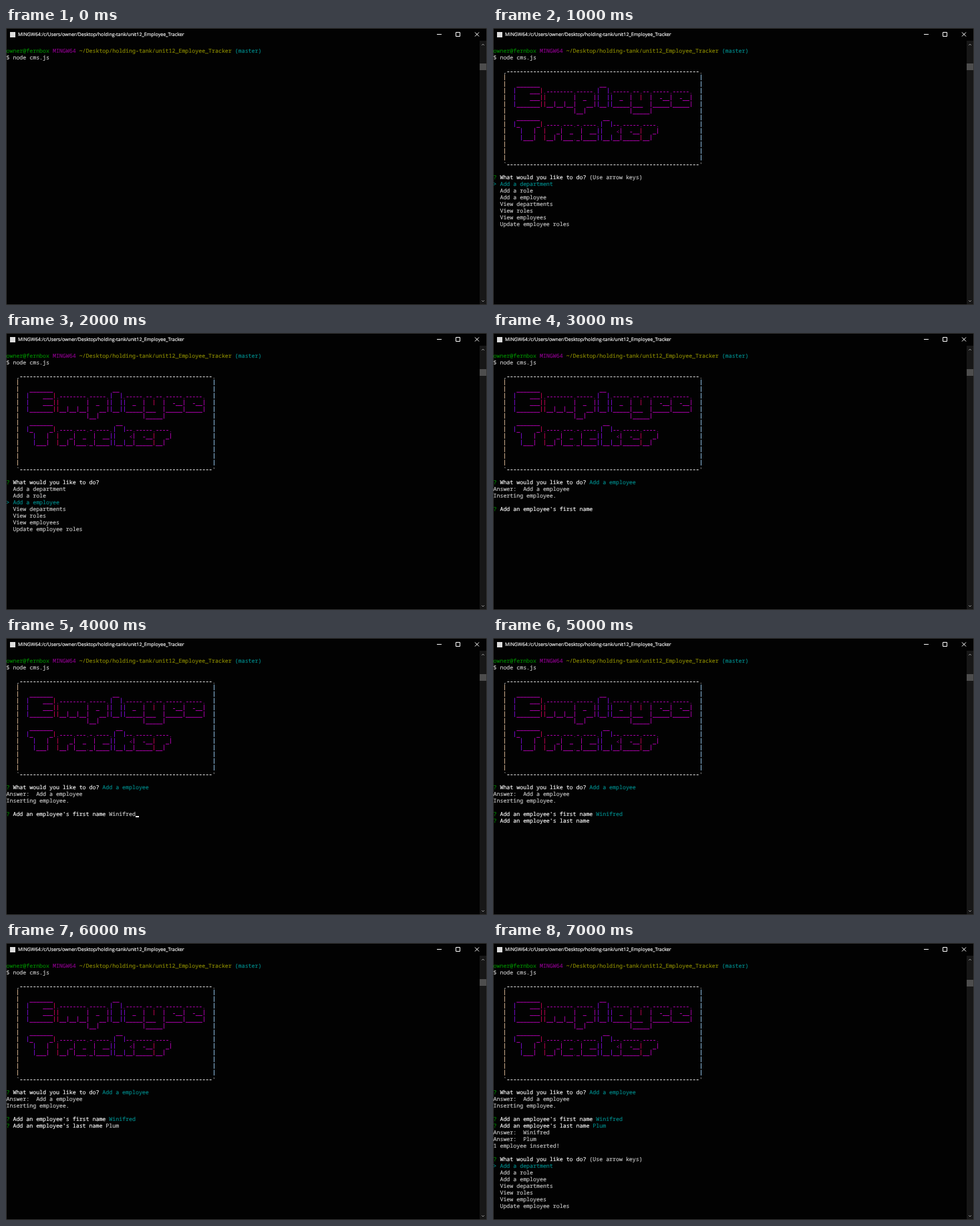
Animation, 720 px wide and 414 px high, one loop 8000 ms. Source, as an HTML page:

```html
<!DOCTYPE html>
<html lang="en">
<head>
<meta charset="utf-8">
<title>Employee Tracker terminal</title>
<style>
  html, body { margin: 0; width: 100%; height: 100%; overflow: hidden; background: #020202; }
  #stage { position: relative; width: 720px; height: 414px; overflow: hidden; background: #020202; }
  #stage > * { position: absolute; margin: 0; }
  svg { left: 0; top: 0; }
  pre, #banner text {
    font: 8.283px "Noto Sans Mono", "DejaVu Sans Mono", monospace;
    text-rendering: geometricPrecision;
    font-variant-ligatures: none;
  }
  pre {
    left: .5px; top: 30px; line-height: 9.97px; color: #ccc; white-space: pre;
    -webkit-text-stroke: .15px currentColor;
  }
  #title {
    left: 18px; top: 4px; color: #fff; white-space: nowrap;
    font: 7.15px/12px "Open Sans", "Noto Sans", sans-serif;
    text-rendering: geometricPrecision;
    -webkit-text-stroke: .15px currentColor;
  }
  .g { color: #008a00; }
  .m { color: #8c008c; }
  .y { color: #8a8a00; }
  .c { color: #008c8c; }
  .w { color: #fff; }
  #thumb { left: 709px; width: 10px; height: 10px; background: #4d4d4d; }
  #cursor { left: 194px; top: 266px; width: 5px; height: 2px; background: #fff; }
</style>
</head>
<body>
<div id="stage">
  <svg width="720" height="414" fill="none">
    <rect x="709" y="19" width="10" height="394" fill="#171717"/>
    <path d="M0 .5H720M.5 0V414M719.5 0V414M0 413.5H720" stroke="#333"/>
    <rect x="6" y="6" width="8" height="8" fill="#ddd"/>
    <path d="M645 9.5h7M673.5 6.5h6v6h-6zM702 6.5l6 6M708 6.5l-6 6" stroke="#fff"/>
    <path d="M712 26l2-2 2 2M712 407l2 2 2-2" stroke="#8a8a8a"/>
  </svg>
  <div id="title">MINGW64:/c/Users/owner/Desktop/holding-tank/unit12_Employee_Tracker</div>
  <svg id="banner" width="720" height="414" role="img" aria-label="Employee Tracker"></svg>
  <pre id="term"></pre>
  <div id="thumb"></div>
  <div id="cursor"></div>
</div>
<script>
const CELL = 4.97, ROW = 9.97, LEFT = .5, TOP = 30;
const STEP = 1000, LOOP = 8000;
const $ = id => document.getElementById(id);

// Banner: lettering inside a dashed frame
const lettering = [
  '',
  ' _______                  __',
  '|    ___|.--------.-----.|  |.-----.--.--.-----.-----.',
  '|    ___||        |  _  ||  ||  _  |  |  |  -__|  -__|',
  '|_______||__|__|__|   __||__||_____|___  |_____|_____|',
  '                  |__|             |_____|',
  ' _______                   __',
  '|_     _|.----.---.-.----.|  |--.-----.----.',
  '  |   |  |   _|  _  |  __||    <|  -__|   _|',
  '  |___|  |__| |___._|____||__|__|_____|__|',
  '', '', ''
];
const dashes = '-'.repeat(58);
const banner = [
  `   ,${dashes}.`,
  ...lettering.map(s => `   |  ${s.padEnd(54)}  |`),
  `   \`${dashes}'`
];

// Thin vertical strokes take a colour fringe that repeats every 29 columns
function barColor(col) {
  if (col === 3) return '#c8a888';
  if (col === 62) return '#8cbce0';
  const phase = col % 29;
  if (phase >= 13 && phase <= 16) return '#b0004c';
  if (phase >= 2 && phase <= 8) return '#7008c0';
  return '#a000a0';
}

function glyph(ch, col, row, ink) {
  const x = LEFT + col * CELL, y = Math.round(TOP + row * ROW);
  const rect = (x, y, w, h, fill) =>
    `<rect x="${x}" y="${y}" width="${w}" height="${h}" fill="${fill}"/>`;
  switch (ch) {
    case ' ': return '';
    case '_': return rect(x, y + 8, CELL + .2, 1, ink);
    case '-': return rect(x + 1, y + 5, 3, 1, ink);
    case '|': return rect(Math.floor(x + CELL / 2 + .1), y - .5, 1, 8.5, barColor(col));
    case '<': ch = '&lt;';
  }
  return `<text x="${x}" y="${y + 8}" fill="${ink}">${ch}</text>`;
}

$('banner').innerHTML = banner.map((line, i) => {
  const edge = i === 0 || i === banner.length - 1;
  return [...line].map((ch, col) => glyph(ch, col, i + 3, edge ? '#e0e0e0' : '#a400a4')).join('');
}).join('');

// Terminal text
const ink = (cls, text) => `<span class="${cls}">${text}</span>`;
const ask = (question, answer = '') => `${ink('g', '?')} ${ink('w', question)} ${answer}`;

const choices = ['Add a department', 'Add a role', 'Add a employee', 'View departments',
  'View roles', 'View employees', 'Update employee roles'];
const what = 'What would you like to do?';
const menu = (picked, hint) => [
  ask(what, hint),
  ...choices.map((s, i) => i === picked ? ink('c', '&gt; ' + s) : '  ' + s)
];

const first = "Add an employee's first name", last = "Add an employee's last name";
const hint = '(Use arrow keys)';
const shell = [
  `${ink('g', 'owner@fernbox')} ${ink('m', 'MINGW64')} ` +
  `${ink('y', '~/Desktop/holding-tank/unit12_Employee_Tracker')} ${ink('c', '(master)')}`,
  '$ node cms.js'
];
const open = [...shell, ...Array(17).fill('')];
const adding = [...open, ask(what, ink('c', 'Add a employee')),
  'Answer:  Add a employee', 'Inserting employee.', ''];
const named = [...adding, ask(first, ink('c', 'Winifred'))];

const screens = [
  shell,
  [...open, ...menu(0, hint)],
  [...open, ...menu(2)],
  [...adding, ask(first)],
  [...adding, ask(first, 'Winifred')],
  [...named, ask(last)],
  [...named, ask(last, 'Plum')],
  [...named, ask(last, ink('c', 'Plum')), 'Answer:  Winifred', 'Answer:  Plum',
    '1 employee inserted!', '', ...menu(0, hint)]
];

let shown = -1;
function draw() {
  const step = Math.floor(performance.now() % LOOP / STEP);
  if (step !== shown) {
    shown = step;
    $('term').innerHTML = screens[step].join('\n');
    $('banner').style.display = step ? '' : 'none';
    $('cursor').style.display = step === 4 ? '' : 'none';
    $('thumb').style.top = (step < 2 ? 53 : step < 7 ? 54 : 55) + 'px';
  }
  requestAnimationFrame(draw);
}
draw();
</script>
</body>
</html>
```
